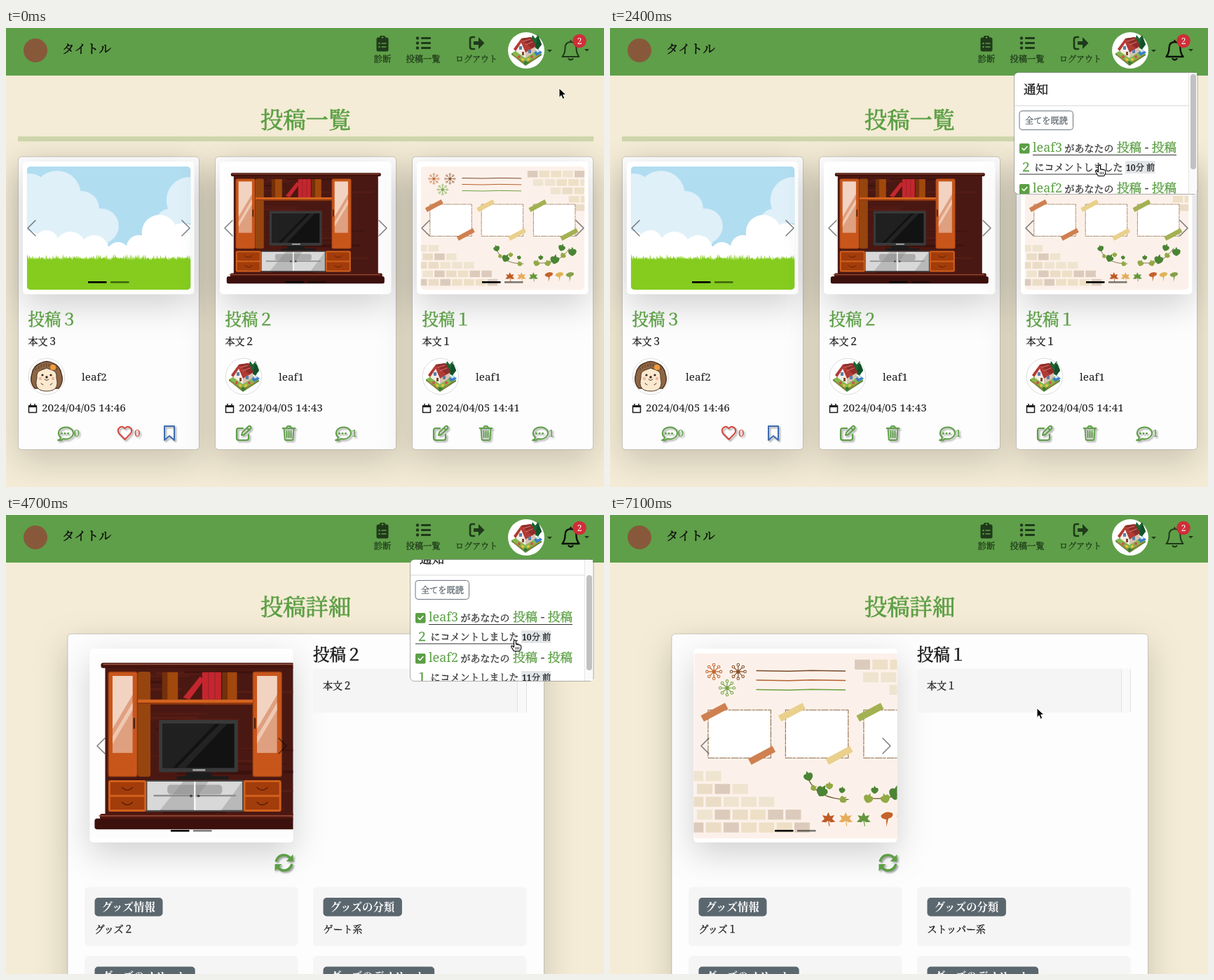
An HTML page for the animation above (7200 ms loop, 853 by 656 pixels).

```html
<!DOCTYPE html>
<html lang="ja">
<head>
<meta charset="utf-8">
<title>投稿一覧</title>
<style>
html, body { margin: 0; height: 100%; overflow: hidden; background: #f4ecd6 }
svg { display: block }
text { font-family: "Noto Serif", "Noto Serif CJK JP", "Noto Sans CJK JP", serif; white-space: pre }
.lift { filter: drop-shadow(0 16px 24px rgba(0,0,0,.175)) }
.drop { filter: drop-shadow(2px 2px 1px rgba(0,0,0,.35)) }
.line { fill: none; stroke-linecap: round; stroke-linejoin: round }
.under { display: none }
.hover .under { display: inline }
</style>
</head>
<body>
<svg id="stage" width="853" height="656" viewBox="0 0 853 656"></svg>
<script>
const GREEN = '#5c9f45', INK = '#1b1b1b', NAV = '#1f3a1a';
let seed = 7;
const rnd = () => (seed = seed * 16807 % 2147483647) / 2147483647;
const times = (n, f) => Array.from({ length: n }, (_, i) => f(i)).join('');
const rect = (x, y, w, h, fill, rx = 0, more = '') =>
  `<rect x="${x}" y="${y}" width="${w}" height="${h}" rx="${rx}" fill="${fill}" ${more}/>`;
const circle = (x, y, r, fill, more = '') => `<circle cx="${x}" cy="${y}" r="${r}" fill="${fill}" ${more}/>`;
const path = (d, fill, more = '') => `<path d="${d}" fill="${fill}" ${more}/>`;
const line = (d, color, w, more = '') => `<path class="line" d="${d}" stroke="${color}" stroke-width="${w}" ${more}/>`;
// A hairline stroke gives the Japanese glyphs a medium weight
const plain = (x, y, size, s, fill = INK, more = '') =>
  `<text x="${x}" y="${y}" font-size="${size}" fill="${fill}" ${more}>${s}</text>`;
const text = (x, y, size, s, fill = INK, more = '') =>
  plain(x, y, size, s, fill, `stroke="${fill}" stroke-width="${size * .024}" ${more}`);
const group = (s, more = '') => `<g ${more}>${s}</g>`;
const at = (x, y, s, k = 1) => group(s, `transform="translate(${x} ${y}) scale(${k})"`);
const use = id => `<use href="#${id}"/>`;
const MID = 'text-anchor="middle"';

// Pictures, each 233.5 x 176
function sky() {
  const puffs = (list, fill) => list.map(c => circle(...c, fill)).join('');
  let d = 'M0 176V132';
  for (let x = 0; x < 236; x += 2.4) d += `L${x + 1} ${125 + rnd() * 6}L${x + 2.4} ${131 + rnd() * 3}`;
  return rect(0, 0, 234, 176, '#b1ddf1') +
    puffs([[4, 38, 28], [43, 40, 34], [78, 60, 25], [106, 85, 25], [30, 90, 50], [90, 100, 28], [232, 48, 33], [205, 82, 22]], '#dff0f9') +
    puffs([[2, 112, 20], [28, 108, 17], [62, 115, 22], [96, 118, 20], [130, 124, 16], [160, 116, 18], [189, 94, 25], [222, 106, 25]], '#fff') +
    rect(0, 114, 234, 30, '#fff') + path(d + 'V176z', '#85cc1f');
}

function cabinet() {
  const door = x => rect(x, 17.6, 27.5, 99.7, '#c8561b', 2, 'stroke="#8a3510" stroke-width=".8"') +
    rect(x + 4, 21.5, 19, 73.2, '#dfa080') + path(`M${x + 4} 21.5h19v18l-19 32z`, '#f2d3c2') +
    path(`M${x + 4} 79l19-32v7l-19 32z`, '#efc8b2');
  const drawers = x => rect(x, 120.6, 36, 30, '#d2601c', 2) + [122.5, 136.5].map(y =>
    rect(x + 2, y, 32, 12, '#a23c0b') + line(`M${x + 13} ${y + 5}q5 5 10 0`, '#5a1d08', .9)).join('');
  return rect(0, 0, 234, 176, '#fdfdfd') + rect(14, 13, 206, 141, '#4a1812') +
    times(34, () => rect(14 + rnd() * 120, 15 + rnd() * 136, 40 + rnd() * 46, .8 + rnd() * 2, rnd() < .6 ? '#5c2018' : '#38100c', 0, 'opacity=".7"')) +
    rect(10, 9, 214, 5, '#45130d', 2) + rect(12, 10, 210, 1, '#9a5a45') +
    rect(45, 17.6, 12, 99.7, '#96450f', 2) + door(17) + door(154) +
    line('M41.5 62v9M156 62v9', '#4c2010', 1.6) +
    rect(68, 18, 5, 26, '#74300b') + rect(73, 18, 10, 26, '#a1480d') +
    path('M88 42l16-20 4 3-14 19z', '#c4262e') + rect(106, 18, 18, 26, '#c4262e') +
    line('M112 18v26M118 18v26', '#96202a', .7) + rect(125, 18, 5, 26, '#74300b') + rect(130, 18, 9, 26, '#a1480d') +
    rect(45, 44, 109, 4.5, '#d4631f') + rect(45, 47, 109, 1.5, '#8a350d') +
    rect(65, 63.5, 75, 49.5, '#393939', 1.5) + rect(68.5, 67, 68, 42, '#121212') +
    path('M68.5 67h50L78 109h-9.5z', '#202020') + path('M108 82l15-15h7L90 109h-8z', '#2c2c2c', 'opacity=".7"') +
    rect(97, 110, 12, 2, '#999') + path('M92 113h22l2 4h15v3H82v-3h8z', '#1c1c1c') +
    drawers(17) + drawers(145) + rect(53, 120.6, 92, 30, '#4c4c4c') + rect(54, 122, 90, 27, '#b9b9b9') +
    path('M54 122h34L66 149H54zM112 122h32l-20 27H99v-10z', '#d8d8d8') +
    rect(73, 125, 52, 9, '#888', 3, 'opacity=".55"') + rect(60, 134.5, 78, 1.6, '#8e8e8e') +
    rect(98.3, 122, 1.4, 27, '#fff') + circle(95.5, 135.5, 1.3, '#444') + circle(102.5, 135.5, 1.3, '#444') +
    rect(9, 152.5, 217, 5.5, '#51170f', 2) + rect(4, 157, 225, 10.3, '#3c100c', 2.5) + rect(8, 154, 215, 1, '#94503c');
}

function paper() {
  const BRICKS = ['#efe4d0', '#ebdcc6', '#dccbbc', '#eee0c6'];
  const bricks = (n, x, y) => times(n, i => rect(x + i * 16.8, y, 14.6, 9.5, BRICKS[Math.floor(rnd() * 4)]));
  const flake = (x, y, c) => times(8, i => {
    const a = i * Math.PI / 4, px = x + 6.5 * Math.cos(a), py = y + 6.5 * Math.sin(a);
    return line(`M${x} ${y}L${px} ${py}`, c, .8) + circle(px, py, 1.2, '#fcf1ea', `stroke="${c}" stroke-width=".7"`);
  }) + circle(x, y, 1.8, c);
  const tape = (x, y, c) => rect(x - 13, y - 3.2, 26, 6.4, c, 0, `transform="rotate(-28 ${x} ${y})"`);
  const frame = (x, c) => rect(x, 54, 59.5, 45.5, '#fff', 0, 'stroke="#8f6540" stroke-width=".7" stroke-dasharray="7 .8 3 .5"') +
    tape(x + 6, 56, c) + tape(x + 51, 97, c);
  const ivy = (x, y, k, c, turn) => group(path('M0 5Q-5 3-5-1-4-4-1.500-3L0-6 1.500-3Q4-4 5-1 5 3 0 5z'.replaceAll('00', ''), c),
    `transform="translate(${x} ${y}) rotate(${turn}) scale(${k})"`);
  const maple = (x, c) => group(times(5, i => path('M0 2L-1.8-3 0-7 1.8-3z', c, `transform="rotate(${(i - 2) * 54})"`)) +
    line('M0 0L1 6', c, .8), `transform="translate(${x} 158)"`);
  const ginkgo = (x, c) => path(`M${x - 1} 158q-6-1-5-4 5-5 11-2 1 4-4 5l-2 8z`, c);
  const DARK = '#4b8434', PALE = '#93a945';
  return rect(0, 0, 234, 176, '#fcf1ea') +
    flake(18.5, 17.5, '#c5672e') + flake(41.5, 17.5, '#87522a') + flake(31, 33, '#72a441') +
    [['#7a4a2a', 16.5], ['#b3602d', 25.5], ['#6d9f3c', 34.5]].map(([c, y]) => line(`M59 ${y}l30 .5 22-.6 32 .5`, c, 1)).join('') +
    bricks(5, 152, 6) + bricks(5, 160, 18) + bricks(3, 185, 30) + bricks(2, 211, 42) + bricks(1, 220, 54) +
    [2, 3, 5, 6, 7].map((n, i) => bricks(n, i % 2 ? 2.5 : -6, 112 + i * 12.2)).join('') +
    frame(13, '#cf8050') + frame(86.4, '#ead08d') + frame(160.6, '#a3b152') +
    line('M107 117q8 22 39 22M161 137q34 6 51-20', '#6b5a35', .8) +
    ivy(108, 117, .9, DARK, -20) + ivy(121, 131, 1.1, DARK, 30) + ivy(128, 126, .7, PALE, 0) + ivy(113, 128, .6, PALE, 60) +
    ivy(141, 139, .7, PALE, 50) + ivy(140, 130, .6, DARK, 10) + ivy(165, 138, .9, PALE, 20) + ivy(171, 130, .7, DARK, 0) +
    ivy(181, 138, .9, PALE, -20) + ivy(191, 133, 1.3, DARK, 10) + ivy(203, 127, .8, PALE, 40) + ivy(216, 122, 1.2, DARK, 0) + ivy(201, 116, 1, DARK, 20) +
    maple(127, '#be5a26') + maple(143.5, '#e6ad5b') + maple(160.5, '#64973c') +
    ginkgo(183, '#c5622a') + ginkgo(198, '#dfb457') + ginkgo(213, '#86a04a');
}

const house = circle(0, 0, 26, '#fff') + path('M-21 4L2-8 22 5-1 21z', '#86b84f') + path('M-21 4L-1 18 22 5v2L-1 22-21 6z', '#4f7f35') +
  path('M5-8l4-14 4 5 4-5 5 13-5 8z', '#1b6432') + path('M13-6l4-14 5 12-5 5z', '#13512a') +
  path('M-14-4L-4-12 3 2-1 11-14 2z', '#f3ece6') + path('M-1 11V1L13-6V2z', '#d6c3b2') +
  path('M-18-2L-7-17 7-19 14-6-1 3-7-11-15 1z', '#b23a34') + path('M-7-17L7-19 14-6 8-3-3-13z', '#8f2d2b') +
  line('M-4-13l10-3M-1-8l10-4', '#d77a70', 1) + rect(-10, -6, 4, 5, '#5a7fa8') + rect(-6, 2, 3, 5, '#7b4a2d') + rect(3, -1, 4, 5, '#5a7fa8') +
  path('M11 3l7-4 5 4-8 5z', '#3c7fc4') + path('M14 1l4-2 2 2-4 2z', '#cfe4f5') + line('M-18 7l15 11M4 17l14-10', '#b5852f', 1.4) +
  circle(-10, 9, 2, '#d05050') + circle(-5, 13, 2, '#e8c23c') + circle(3, 13, 2, '#e8c23c') + circle(8, 9, 2, '#d05050') + circle(-1, 17, 2, '#2f7a34');

const hedgehog = circle(0, 0, 26, '#fff') +
  path('M-17 17Q-25 8-21-4-19-15-9-19 0-24 9-19 19-15 21-4 25 8 17 17z', '#8d6644', 'stroke="#4f3423" stroke-width="1.4"') +
  times(9, i => line(`M${-15 + i * 3.7} ${-8 - 7 * Math.sin((i + .5) / 9 * Math.PI)}v-3`, '#5b3d28', 1)) +
  path('M-14 2Q-15-7-8-9L0-12 8-9Q15-7 14 2 19 21 0 21-19 21-14 2z', '#fae8cf', 'stroke="#4f3423" stroke-width="1"') +
  circle(-6, -2, 1.6, '#3a261a') + circle(6, -2, 1.6, '#3a261a') + circle(0, 1, 1.8, '#3a261a') + line('M-3 4q3 3 6 0', '#3a261a', .9) +
  circle(-9, 3, 2.2, '#f3b6a0') + circle(9, 3, 2.2, '#f3b6a0') + circle(9, -13, 4, '#ef9b3c') + line('M-8 10l3 2M8 10l-3 2', '#4f3423', 1);

// Icons
const comment = line('M5 18Q4 22 1 22 6 23 9 20A10.5 8.5 0 1 0 5 18z', GREEN, 2) + [6.5, 11, 15.5].map(x => circle(x, 12.5, 1.4, GREEN)).join('');
const edit = line('M10 5H4Q1 5 1 8v11q0 3 3 3h11q3 0 3-3v-5', GREEN, 2.2) + line('M8 15l1-4L18 2q2-1 3 1 1 1 0 2.5L12 14zM15.5 4.5l3 3', GREEN, 1.9);
const trash = line('M0 5h18M5 5l2-3h4l2 3M2 5l1 15q0 2 2 2h8q2 0 2-2l1-15M6 9v9M9 9v9M12 9v9', GREEN, 1.8);
const heart = line('M10.5 20L2.5 12Q-1 7 2.5 3.5 7-.5 10.5 4.5 14-.5 18.5 3.5 22 7 18.5 12z', '#d4483f', 2);
const bookmark = line('M1 1h14v20l-7-6-7 6z', '#3f6db0', 2);
const calendar = line('M1 3.5h11v9.5H1zM3.5 1v2M9.5 1v2', INK, 1.5) + rect(.5, 3, 12, 2.6, INK);
const refresh = line('M-11-3Q-8-11 0-11q6 0 10 6M11 3Q8 11 0 11q-6 0-10-6', GREEN, 3.6) +
  path('M13-12v10H3zM-13 12V2h10z', GREEN);
const clipboard = rect(528.5, 13.5, 17, 20, NAV, 2.5) + rect(533, 11, 8, 6, NAV, 2) + circle(537, 13.5, 1.2, GREEN) +
  line('M536 22h6M536 27h6', GREEN, 1.5) + circle(532.5, 22, 1.2, GREEN) + circle(532.5, 27, 1.2, GREEN);
const list = [14.5, 21.5, 28.5].map(y => circle(587, y, 2.2, NAV) + rect(592, y - 1.4, 14, 2.8, NAV, 1)).join('');
const logout = line('M668 13h-3q-3 0-3 3v11q0 3 3 3h3', NAV, 2.6) + path('M667 19h7v-6l8.5 8.5-8.5 8.5v-6h-7z', NAV);
const caret = (x, y) => path(`M${x} ${y}h7l-3.5 3.5z`, NAV);

const chevrons = (l, r, y) => line(`M${l + 11} ${y - 11}l-11 11 11 11M${r - 11} ${y - 11}l11 11-11 11`, '#000', 1.5, 'opacity=".5"');
const marks = (x, y) => rect(x, y, 26.5, 2.6, '#000') + rect(x + 32, y, 26.5, 2.6, '#000', 0, 'opacity=".5"');
const CARD = 'stroke="#000" stroke-opacity=".18"';

function card(x, n, pic, face, name, time) {
  const own = n < 3, count = own ? 1 : 0, cx = own ? 171 : 56;
  return at(x, 0, group(rect(.5, 184, 258, 418.5, '#fdfdfd', 5, CARD), 'class="lift"') +
    group(rect(7, 191, 244.5, 189.5, '#fff', 5), 'class="lift"') +
    at(12.8, 198, group(use(pic), 'clip-path="url(#small)"')) + chevrons(14, 245, 286) + marks(100, 362) +
    text(14.5, 425, 23.4, '投稿' + '１２３'[n - 1], GREEN) + text(14.5, 453, 14, '本文' + '１２３'[n - 1]) +
    at(41, 498, use(face)) + circle(41, 498, 25.8, 'none', 'stroke="#ddd"') + plain(91, 504, 15.3, name) +
    at(14.5, 536.5, calendar) + plain(34, 548, 15.3, '2024/04/05 ' + time) +
    group(at(cx, 567, comment) + plain(cx + 23.5, 583.5, 15.3, count, GREEN) +
      (own ? at(30, 567, edit) + at(96.5, 567, trash)
        : at(142, 568, heart) + plain(166, 583.5, 15.3, 0, '#d4483f') + at(208, 568, bookmark)), 'class="drop"'));
}

function tile(x, y, label, id) {
  return rect(x, y, 304.5, 84.5, '#f5f5f5', 6) + rect(x + 14.5, y + 15.5, label.length * 15.4 + 20, 26.5, '#5b676e', 5) +
    plain(x + 24.5, y + 34.5, 15.4, label, '#fff', 'font-weight="700"') + text(x + 14.5, y + 65, 14, '', INK, `id="${id}"`);
}

function notice(id, y, who, post, ago) {
  return group(rect(584, y - 12, 14.5, 14.5, GREEN, 2) + line(`M588 ${y - 5}l2.5 2.5 4.5-5`, '#fff', 1.6) +
    plain(603, y, 18, who, GREEN) + text(648.5, y, 14, 'があなたの', '#333') +
    text(723, y, 17.6, '投稿 <tspan fill="#333" stroke="none">-</tspan> 投稿', GREEN) + text(584.5, y + 28, 17.6, post, GREEN) +
    text(605.5, y + 27, 14, 'にコメントしました', '#333') + rect(735, y + 13, 42.5, 18, '#e3e6e9') + text(736, y + 27, 12.2, ago) +
    path(`M603 ${y + 4.5}h205M584 ${y + 32}h147`, 'none', 'class="under" stroke="#333"'), `id="${id}"`);
}

const link = (x, s, size, icon) => text(x, 49, size, s, NAV, MID) + group(icon, 'class="icon"');
const stage = document.getElementById('stage');
stage.innerHTML = `<defs>
  <clipPath id="small">${rect(0, 0, 233.5, 176, '#000', 5)}</clipPath>
  <clipPath id="big">${rect(119.5, 191, 290, 277, '#000', 5)}</clipPath>
  <clipPath id="panel">${rect(577, 64, 248.5, 173, '#000')}</clipPath>
  ${group(sky(), 'id="sky"') + group(cabinet(), 'id="cabinet"') + group(paper(), 'id="paper"') + group(house, 'id="house"') + group(hedgehog, 'id="hedgehog"')}
</defs>` + rect(0, 0, 853, 656, '#f4ecd6') +
group(rect(0, -2, 853, 70, '#5f9f49') + circle(42, 32, 17, '#87593a') + text(80, 36, 17.6, 'タイトル', '#0c0c0c') +
  group(link(537, '診断', 12.3, clipboard) + link(595, '投稿一覧', 12.3, list) + link(671, 'ログアウト', 12, logout) +
    at(742, 32, use('house')) + caret(772, 31), 'id="links"') + caret(825, 30) +
  group(line('M805.5 20q8 0 8 9 0 7 4 12h-24q4-5 4-12 0-9 8-9zM805.5 18v1M802.5 44q3 3 6 0', NAV, 2), 'id="bell" class="icon"') +
  group(circle(818, 18.5, 9.8, '#cf2e38') + plain(818, 22.8, 12, 2, '#fff', MID), 'id="badge"') +
  text(427.5, 143, 32.3, '', GREEN, MID + ' id="heading"') +
  group(rect(17, 155, 821, 7, '#cfd6ad') + card(17, 3, 'sky', 'hedgehog', 'leaf2', '14:46') +
    card(298, 2, 'cabinet', 'house', 'leaf1', '14:43') + card(579, 1, 'paper', 'house', 'leaf1', '14:41'), 'id="posts"') +
  group(group(rect(88, 170, 679.5, 560, '#fdfdfd', 5, CARD), 'class="lift"') +
    group(rect(119.5, 191, 290, 277, '#fff', 5), 'class="lift"') +
    group('<use id="photo" transform="translate(120.4 197.6) scale(1.504)"/>', 'clip-path="url(#big)"') +
    chevrons(130, 400, 330) + marks(235, 450) + text(438, 208, 23.4, '', INK, 'id="postTitle"') +
    rect(438, 219.5, 304.5, 63, '#f5f5f5', 4) + rect(729.5, 219.5, 12.5, 63, '#f9f9f9') +
    path('M729.5 220v62M742.5 220v62', 'none', 'stroke="#e2e2e2"') + text(452, 249, 14, '', INK, 'id="postBody"') +
    group(at(396.5, 497, refresh), 'class="drop icon"') +
    group(tile(112, 531.5, 'グッズ情報', 'goods') + tile(438, 531.5, 'グッズの分類', 'kind') +
      tile(112, 630, 'グッズのメリット', 'merit') + tile(438, 630, 'グッズのデメリット', 'demerit'), 'id="tiles"'), 'id="detail"') +
  group(rect(576.5, 63.5, 261.5, 174, '#fff', 6, 'stroke="#000" stroke-opacity=".3"') +
    group(group(text(590, 94, 17.6, '通知') + rect(577, 110.5, 249, 1, '#d5d5d5') +
      rect(584, 118.5, 76.5, 27, '#fff', 4, 'stroke="#6c757d"') + text(592, 136.5, 12.2, '全てを既読', '#5c666d') +
      notice('first', 177, 'leaf3', '２', '10分 前') + notice('second', 235, 'leaf2', '１', '11分 前'), 'id="scroll"'), 'clip-path="url(#panel)"') +
    rect(825, 64, 12, 173, '#fafafa') + rect(825, 64, 1, 173, '#e6e6e6') + rect(828, 66, 8, 136, '#c1c1c1', 4, 'id="thumb"'), 'id="menu"'),
  'id="page"') +
group(path('M0 0V13.5l3-3 2.2 5 2.6-1.1-2.1-4.9H10z', '#000', 'stroke="#fff" stroke-width="1"'), 'id="arrow"') +
group(path('M-1.5 1Q0-1 1.5 1V6q1.5-1 2.5.5 1.5-1 2.5.5 2-.5 2.2 1.5V12l-2 3.5H-1.5L-5 10q-1-2 .8-2.2L-1.5 10z', '#fff', 'stroke="#000" stroke-width="1.1" stroke-linejoin="round"') +
  line('M1.2 10v3M3.4 10v3M5.6 10v3', '#000', .8), 'id="hand"');

const el = id => document.getElementById(id);
const show = (e, on) => e.style.display = on ? '' : 'none';
const move = (id, x, y) => el(id).setAttribute('transform', `translate(${x} ${y})`);
const write = (id, s) => { el(id).textContent = s; };
const within = (t, a, b) => t >= a && t < b;

// Eased position on a list of [time, ...values]
function track(keys, t) {
  const i = keys.findIndex(k => k[0] > t);
  if (i < 1) return (i ? keys[keys.length - 1] : keys[0]).slice(1);
  const [a, b] = [keys[i - 1], keys[i]], u = (t - a[0]) / (b[0] - a[0]), e = u * u * (3 - 2 * u);
  return a.slice(1).map((v, j) => v + (b[j + 1] - v) * e);
}
const POINTER = [[0, 789, 86], [500, 806, 36], [900, 806, 36], [1500, 780, 116], [2100, 698, 196], [3300, 698, 196],
  [3900, 808, 36], [4200, 808, 36], [4700, 726, 179], [5300, 726, 182], [6200, 697, 221], [6500, 697, 221], [7000, 609, 276]];
const SCROLL = [[4400, 0], [4700, 25], [4800, 40]];

function draw(t) {
  const posts = t < 2700, bare = within(t, 2700, 2900), n = t < 6400 ? '２' : '１';
  show(el('posts'), posts);
  show(el('detail'), !posts);
  show(el('menu'), within(t, 800, 2700) || within(t, 4200, 6400));
  document.querySelectorAll('.icon').forEach(e => show(e, !bare));
  move('page', 0, bare ? -1 : 0);
  move('links', bare ? 24.5 : 0, 0);
  move('badge', 0, bare ? 20 : 0);
  move('tiles', 0, bare ? -27.5 : 0);
  const lit = within(t, 500, 2700) || within(t, 3900, 6400), bell = el('bell').firstChild;
  bell.setAttribute('stroke-width', lit ? 2.4 : 2);
  bell.setAttribute('stroke', lit ? '#0b120a' : NAV);

  write('heading', posts ? '投稿一覧' : '投稿詳細');
  write('postTitle', '投稿' + n);
  write('postBody', '本文' + n);
  write('goods', 'グッズ' + n);
  write('kind', n === '２' ? 'ゲート系' : 'ストッパー系');
  write('merit', 'メリット' + n);
  write('demerit', 'デメリット' + n);
  el('photo').setAttribute('href', n === '２' ? '#cabinet' : '#paper');

  const [scroll] = track(SCROLL, t);
  move('scroll', 0, -scroll);
  move('thumb', 0, scroll * .8);
  el('first').classList.toggle('hover', within(t, 1900, 2700) || within(t, 4500, 4900));
  el('second').classList.toggle('hover', t >= 4900);

  const hand = within(t, 1900, 3400) || within(t, 4500, 6500);
  show(el('hand'), hand);
  show(el('arrow'), !hand);
  move(hand ? 'hand' : 'arrow', ...track(POINTER, t));
}

let last = -1;
const start = performance.now();
function tick() {
  const t = Math.floor((performance.now() - start) % 7200 / 100) * 100;
  if (t !== last) draw(last = t);
  requestAnimationFrame(tick);
}
tick();
</script>
</body>
</html>
```
